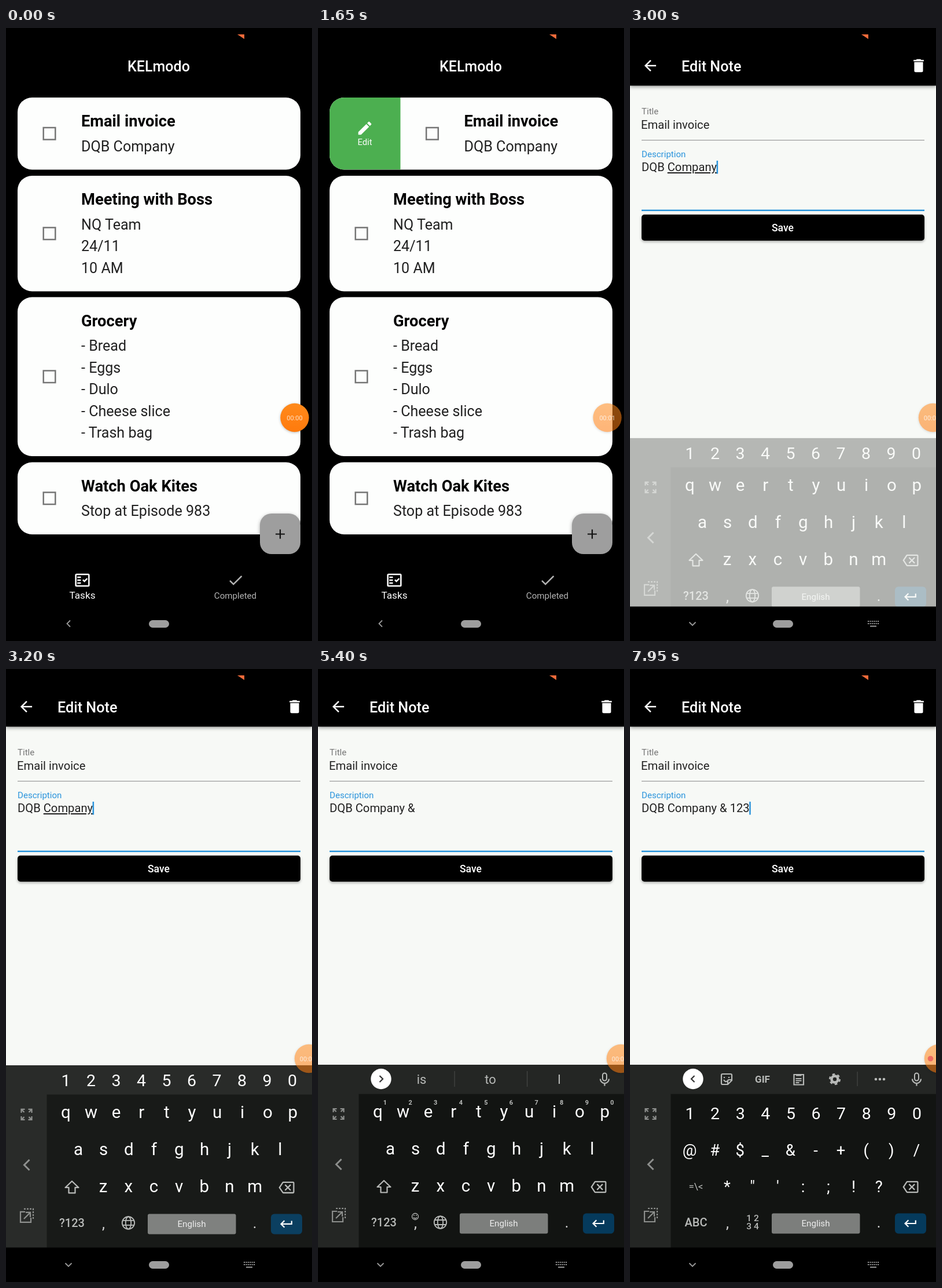
These frames come from a looping animation (529x1058 px, 8 s). An HTML page:

```html
<!DOCTYPE html>
<html lang="en">
<head>
<meta charset="utf-8">
<title>Notes app</title>
<style>
html, body { margin: 0; width: 100%; height: 100%; overflow: hidden; background: #000; }
svg { display: block; width: 100vw; height: 100vh; font-family: Roboto, sans-serif; }
text { white-space: pre; }
.mid { text-anchor: middle; }
.line { fill: none; stroke-width: 2.2; }
</style>
</head>
<body>
<svg id="stage" viewBox="0 0 529 1058"></svg>
<script>
const LOOP = 8000, BLUE = '#2a94dc', COMPANY = 'DQB Company';

// Markup helpers
const text = (x, y, size, str, fill = '#fff', extra = '') =>
  `<text x="${x}" y="${y}" font-size="${size}" fill="${fill}" ${extra}>${str.replace(/&/g, '&amp;').replace(/</g, '&lt;')}</text>`;
const centered = (x, y, size, str, fill = '#fff', weight = 400) =>
  text(x, y, size, str, fill, `class="mid" font-weight="${weight}"`);
const box = (x, y, w, h, fill, r = 0, extra = '') =>
  `<rect x="${x}" y="${y}" width="${w}" height="${h}" rx="${r}" fill="${fill}" ${extra}/>`;
const disc = (x, y, r, fill) => `<circle cx="${x}" cy="${y}" r="${r}" fill="${fill}"/>`;
const line = (d, stroke, extra = '') => `<path class="line" d="${d}" stroke="${stroke}" ${extra}/>`;
const icon = (x, y, d, fill = '#fff', s = 1.26) =>
  `<path transform="translate(${x - 12 * s} ${y - 12 * s}) scale(${s})" fill="${fill}" d="${d}"/>`;
const group = (id, body, extra = '') => `<g id="${id}" ${extra}>${body}</g>`;
const keyRow = (keys, x, step, y, size, fill = '#fff', weight = 400) =>
  keys.split(' ').map((k, i) => centered(x + step * i, y, size, k, fill, weight)).join('');

// Home screen
const cards = [
  [120, 124.5, 'Email invoice', COMPANY],
  [255, 199.5, 'Meeting with Boss', 'NQ Team', '24/11', '10 AM'],
  [464.5, 274.5, 'Grocery', '- Bread', '- Eggs', '- Dulo', '- Cheese slice', '- Trash bag'],
  [749.5, 124.5, 'Watch Oak Kites', 'Stop at Episode 983'],
];
const cardBody = ([y, h, title, ...lines]) =>
  box(64.7, y + h / 2 - 10.3, 20.6, 20.6, 'none', 0, 'stroke="#757575" stroke-width="2.5"') +
  text(130, y + 50, 27.3, title, '#000', 'font-weight="700"') +
  lines.map((s, i) => text(130, y + 92.5 + 37.5 * i, 25.1, s, '#212121')).join('');
const pencil = 'M3 17.25V21h3.75L17.81 9.94l-3.75-3.75zM20.71 7.04c.39-.39.39-1.02 0-1.41l-2.34-2.34a1 1 0 0 0-1.41 0l-1.83 1.83 3.75 3.75z';
const editAction = box(-102.5, 120, 122.5, 124.5, '#4caf50') +
  icon(-41.5, 173, pencil) + centered(-41.5, 202, 14.8, 'Edit');
const home =
  centered(264, 74.5, 25, 'KELmodo', '#fff', 500) +
  cards.map((c, i) => box(20, c[0], 489, c[1], '#fdfefd', 25) +
    (i ? cardBody(c) : `<g clip-path="url(#firstCard)">${group('swipe', editAction + cardBody(c))}</g>`)).join('') +
  box(439, 838, 70, 70, '#9e9e9e', 20, 'style="filter:drop-shadow(0 2px 3px #0005)"') +
  line('M466 873.5h16M474 865.5v16', '#111') +
  icon(132, 953, 'M20 3H4a2 2 0 0 0-2 2v14a2 2 0 0 0 2 2h16a2 2 0 0 0 2-2V5a2 2 0 0 0-2-2zM20 19H4V5h16zM19.41 10.42 17.99 9l-3.17 3.17-1.41-1.42L12 12.16 14.82 15zM5 7h5v2H5zM5 11h5v2H5zM5 15h5v2H5z', '#fff" fill-rule="evenodd') +
  centered(132, 984.5, 17.2, 'Tasks') +
  icon(397, 953, 'M9 16.17 4.83 12l-1.42 1.41L9 19 21 7l-1.41-1.41z', '#b4b4b4') +
  centered(396.5, 985, 15.1, 'Completed', '#b4b4b4');

// Edit screen
const [shortName, word] = COMPANY.split(' ');
const editor =
  box(0, 0, 529, 1058, '#f7f9f6') +
  box(0, 0, 529, 99.5, '#000', 0, 'style="filter:drop-shadow(0 2px 3px #0006)"') +
  icon(35, 65, 'M20 11H7.83l5.59-5.59L12 4l-8 8 8 8 1.41-1.41L7.83 13H20z') +
  text(89, 74.5, 25.2, 'Edit Note', '#fff', 'font-weight="500"') +
  icon(499, 65, 'M6 19a2 2 0 0 0 2 2h8a2 2 0 0 0 2-2V7H6zM19 4h-3.5l-1-1h-5l-1 1H5v2h14z') +
  text(20, 149, 15.1, 'Title', '#757575') +
  text(19, 174, 20.2, 'Email invoice', '#212121') +
  box(20, 193, 489, 1.2, '#999') +
  text(20, 223, 15.1, 'Description', '#757575', 'id="label"') +
  `<text id="desc" x="20" y="247" font-size="20.2" fill="#212121">${shortName} <tspan id="word">${word}</tspan><tspan id="tail"></tspan></text>` +
  box(0, 229, 2.5, 22.5, BLUE, 0, 'id="cursor"') +
  box(20, 314, 489, 1.2, '#999', 0, 'id="rule"') +
  box(20, 322, 489, 45, '#000', 5, 'style="filter:drop-shadow(0 2px 2px #0005)"') +
  centered(264, 351, 17.6, 'Save', '#fff', 500);

// Keyboard
const GREY = '#b8bab8', DIM = '#8c8e8c', DIGITS = '1 2 3 4 5 6 7 8 9 0';
const mic = box(492, 697.5, 7, 13, 'none', 3.5, `stroke="${GREY}" stroke-width="2"`) +
  line('M488 707.5a7.5 7.5 0 0 0 15 0M495.5 715v4.5', GREY);
const barButton = d => disc(109, 707.5, 17.7, '#fff') + line(d, '#333');
const suggestions = barButton('M106.5 702l5.5 5.5-5.5 5.5') + mic +
  [[179, 'is'], [298, 'to'], [417, 'I']].map(([x, s]) => centered(x, 716, 22, s, GREY)).join('') +
  box(235.5, 694, 1.2, 27, '#454745') + box(361, 694, 1.2, 27, '#454745');
const toolbar = barButton('M111.5 702l-5.5 5.5 5.5 5.5') + mic +
  line('M158 701q0-2 2-2h14q2 0 2 2v9l-7 7h-9q-2 0-2-2zM176 709h-5q-2 0-2 2v6M162 709q3 5 6 2M163 704v2M171 704v2', GREY) +
  centered(229, 713.8, 17, 'GIF', GREY, 700) +
  line('M283.5 700h16.500v17.500h-16.500zM287 701.500h9.500M286.500 707h10M286.500 710.500h10M286.500 714h6', GREY) +
  `<circle class="line" cx="354" cy="708" r="5.500" stroke="${GREY}" style="stroke-width:4.500"/>` +
  `<circle class="line" cx="354" cy="708" r="8.800" stroke="${GREY}" stroke-dasharray="4.600" style="stroke-width:2.500"/>` +
  box(392.5, 695, 1.2, 25, '#454745') + [425, 432, 439].map(x => disc(x, 708, 2.3, GREY)).join('');
const letters =
  keyRow('q w e r t y u i o p', 103.5, 43.6, 774, 29.5) +
  keyRow('a s d f g h j k l', 125, 43.6, 838, 29.5) +
  keyRow('z x c v b n m', 168, 43.7, 902, 29.5) +
  line('M114 883l11.500 11h-6v9.500h-11v-9.500h-6z', GREY, 'stroke-linejoin="round"') +
  centered(114, 962, 20, '?123', GREY, 500) +
  `<g class="line" stroke="${GREY}" style="stroke-width:1.800"><circle cx="211.500" cy="955" r="10.700"/><ellipse cx="211.500" cy="955" rx="4.700" ry="10.700"/><path d="M202 951h19M202 959h19"/></g>`;
const hints = keyRow(DIGITS, 116, 43.6, 752, 11, GREY, 700) +
  `<circle class="line" cx="168" cy="945" r="5.500" stroke="${GREY}" style="stroke-width:1.300"/>` +
  line('M165 946.500q3 3.500 6 0M166 942v2M170 942v2', GREY, 'style="stroke-width:1.300"');
const symbols =
  keyRow(DIGITS, 103.5, 43.6, 776.5, 28.5) +
  keyRow('@ # $ _ & - + ( ) /', 103, 43.6, 839.5, 27.5) +
  keyRow('* " \' : ; ! ?', 168, 43.7, 903, 27.5) +
  centered(114, 899, 17, '=\\<', GREY) +
  centered(114, 962, 20, 'ABC', GREY, 500) +
  centered(212, 952.5, 15.5, '1 2', GREY, 500) + centered(212, 967, 15.5, '3 4', GREY, 500);
const corner = (sx, sy) => {
  const x = 35.5 + sx * 9, y = 768 + sy * 9;
  return `M${x - sx * 6} ${y}H${x}V${y - sy * 6}M${x} ${y}L${x - sx * 5} ${y - sy * 5}`;
};
const keyboard =
  box(0, 683, 529, 376, '#242624') + box(70.5, 733.5, 459, 325, '#121412') +
  line(corner(-1, -1) + corner(1, -1) + corner(-1, 1) + corner(1, 1), DIM) +
  line('M40.500 846l-9 9 9 9', DIM, 'style="stroke-width:3"') +
  line('M33 936h-8v18h18v-8M31 948l10-10M34 937h8v8', DIM) +
  line('M31 931h16v17', DIM, 'stroke-dasharray="3 2"') +
  group('numberBar', keyRow(DIGITS, 103.5, 43.5, 719, 28.5)) +
  group('suggestions', suggestions) + group('toolbar', toolbar) +
  group('letters', letters) + group('hints', hints) + group('symbols', symbols) +
  icon(485, 894, 'M22 3H7c-.69 0-1.23.35-1.59.88L0 12l5.41 8.11c.36.53.9.89 1.59.89h15a2 2 0 0 0 2-2V5a2 2 0 0 0-2-2zm0 16H7.07L2.4 12l4.66-7H22zm-11.59-2L14 13.41 17.59 17 19 15.59 15.41 12 19 8.41 17.59 7 14 10.59 10.41 7 9 8.41 12.59 12 9 15.59z', GREY, 1.13) +
  centered(168.5, 965, 25, ',', '#ddd') + centered(430, 964, 25, '.', '#ddd') +
  box(245, 939.5, 152.5, 35, '#7c7e7c', 3) + centered(321, 962, 15.2, 'English', '#eee') +
  box(458, 939.5, 54, 35, '#053a5c', 6) +
  icon(485, 957, 'M19 7v4H5.83l3.58-3.59L8 6l-6 6 6 6 1.41-1.41L5.83 13H21V7z', '#fff', 1.1);

// System bars and recorder bubble
const dots = [1023, 1027].map(y => [0, 1, 2, 3, 4, 5].map(i => box(411 + i * 3.4, y, 2, 2, '#9a9a9a')).join('')).join('');
const system =
  box(0, 998.5, 529, 60, '#000') + box(247, 1022, 35, 13, '#9e9e9e', 6.5) +
  group('navBack', line('M111 1022.500l-5.500 5.500 5.500 5.500', '#9a9a9a', 'style="stroke-width:1.800"')) +
  group('navHide', line('M102.500 1025.500l5.500 5.500 5.500-5.500', '#9a9a9a', 'style="stroke-width:1.800"') + dots + box(415, 1031.5, 11, 2, '#9a9a9a')) +
  '<path d="M400 11h12v8z" fill="#f26a3a"/>';
const bubble =
  `<circle id="ball" cx="0" cy="672.500" r="24.700" fill="url(#orange)" style="filter:drop-shadow(0 1px 2px #0004)"/>`;

const stage = document.getElementById('stage');
stage.innerHTML = `<defs>
  <clipPath id="firstCard"><rect x="20" y="120" width="489" height="124.500" rx="25"/></clipPath>
  <linearGradient id="orange" x2="0" y2="1"><stop stop-color="#ff8a1c"/><stop offset="1" stop-color="#ff7a0c"/></linearGradient>
</defs>` + box(0, 0, 529, 1058, '#000') + home + group('editor', editor) + group('keyboard', keyboard) + system +
  group('bubble', bubble) + centered(0, 676.5, 11, '', '#fff').replace('<text', '<text id="timer" opacity=".75"') +
  disc(519.5, 672.5, 4.8, '#ee6b62').replace('<circle', '<circle id="recDot"');

const $ = id => document.getElementById(id);
const set = (id, attrs) => { for (const k in attrs) $(id).setAttribute(k, attrs[k]); };
const show = (id, on) => set(id, { visibility: on ? 'visible' : 'hidden' });
const put = (id, str) => { if ($(id).textContent !== str) $(id).textContent = str; };

// Timing helpers
const ramp = (t, from, to) => Math.min(1, Math.max(0, (t - from) / (to - from)));
const easeOut = p => 1 - (1 - p) ** 2;
const bezier = (x1, y1, x2, y2) => p => {
  const at = (a, b, s) => 3 * (1 - s) ** 2 * s * a + 3 * (1 - s) * s * s * b + s ** 3;
  let lo = 0, hi = 1;
  for (let i = 0; i < 24; i++) {
    const m = (lo + hi) / 2;
    if (at(x1, x2, m) < p) lo = m; else hi = m;
  }
  return at(y1, y2, lo);
};
const fastOutSlowIn = bezier(.4, 0, .2, 1), easeIn = bezier(.42, 0, 1, 1);

const FOCUS = 2950, SPACE = 4050;
const strokes = [[FOCUS, ''], [SPACE, ' '], [4650, ' &'], [4900, ' & '], [7200, ' & 1'], [7450, ' & 12'], [7700, ' & 123']];

function render(t) {
  const swipe = fastOutSlowIn(ramp(t, 350, 1050)) - fastOutSlowIn(ramp(t, 1750, 2050));
  set('swipe', { transform: `translate(${122.5 * swipe} 0)` });

  const open = ramp(t, 1850, 2150);
  show('editor', open > 0);
  set('editor', { opacity: easeIn(open), transform: `translate(0 ${250 * (1 - fastOutSlowIn(open))})` });

  const focused = t >= FOCUS;
  set('label', { fill: focused ? BLUE : '#757575' });
  set('rule', { fill: focused ? BLUE : '#999', y: focused ? 313.5 : 314, height: focused ? 2.5 : 1.2 });
  set('word', { 'text-decoration': focused && t < SPACE ? 'underline' : 'none' });
  const [since, tail] = strokes.filter(s => s[0] <= t).pop() || strokes[0];
  put('tail', tail);
  show('cursor', focused && Math.floor((t - since) / 500) % 2 === 0);
  set('cursor', { x: 19.5 + $('desc').getComputedTextLength() });

  const rise = easeOut(ramp(t, FOCUS, 3250));
  show('navBack', !focused);
  show('navHide', focused);
  set('keyboard', { opacity: rise, transform: `translate(0 ${36 * (1 - rise)})`, display: focused ? 'inline' : 'none' });
  const symbolMode = t >= 4400 && t < 4900 || t >= 6000;
  const early = t < 3500, tools = t >= 7250;
  show('numberBar', early);
  show('suggestions', !early && !tools);
  show('toolbar', tools);
  show('letters', !symbolMode);
  show('hints', !symbolMode && !early);
  show('symbols', symbolMode);

  const dock = easeOut(ramp(t, 1650, 1950)), tuck = easeOut(ramp(t, 6300, 6500));
  const faded = ramp(t, 800, 1050);
  const x = 499 + faded + 23.5 * dock + 10 * tuck;
  set('ball', { cx: x });
  set('bubble', { opacity: 1 - .45 * faded });
  set('timer', { x: x - 2 * dock });
  put('timer', '00:0' + Math.floor(t / 1000));
  show('timer', !tuck);
  show('recDot', tuck > 0);
}

function tick() {
  render(performance.now() % LOOP);
  requestAnimationFrame(tick);
}
tick();
</script>
</body>
</html>
```
